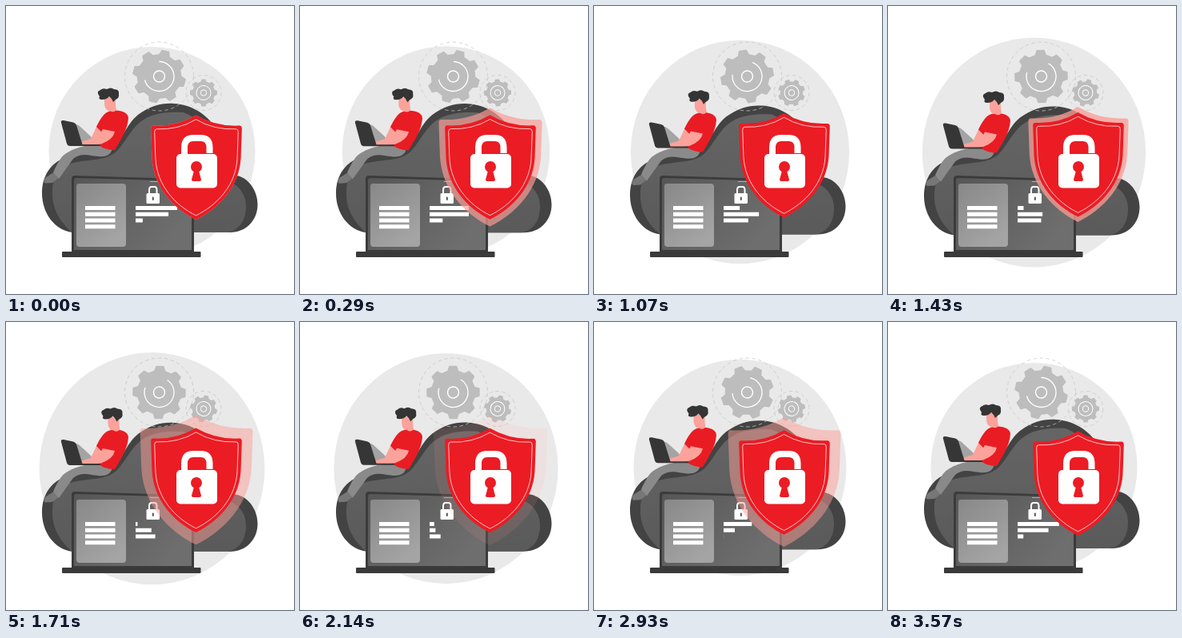
Animation of 360x360 px, one loop 3.64 s. Source, as an HTML page:

```html
<!DOCTYPE html>
<html lang="en">
<head>
<meta charset="utf-8">
<title>Cloud security</title>
<style>
html, body { margin: 0; width: 100%; height: 100%; overflow: hidden; background: #fff; }
svg { display: block; width: 100vw; height: 100vh; }
.thin { fill: none; stroke: #fff; }
.dash { fill: none; stroke: #c6c6c6; stroke-width: .7; stroke-dasharray: 4.5 3.5; }
</style>
</head>
<body>
<svg viewBox="0 0 360 360">
  <defs>
    <linearGradient id="cloudFill" x1="0" y1="0" x2="0" y2="1">
      <stop offset="0" stop-color="#656565"/><stop offset="1" stop-color="#5a5a5a"/>
    </linearGradient>
    <linearGradient id="screenFill" x1="0" y1="0" x2="1" y2=".5">
      <stop offset="0" stop-color="#565656"/><stop offset="1" stop-color="#6e6e6e"/>
    </linearGradient>
    <linearGradient id="panelFill" x1="0" y1="0" x2=".6" y2="1">
      <stop offset="0" stop-color="#888"/><stop offset="1" stop-color="#a4a4a4"/>
    </linearGradient>
    <path id="shield" d="M237.500 136.500Q213 151 184 149.500Q181 149.500 181.200 153.500L182.500 190C184.500 226 209 253 237.500 267C266 253 291.500 226 293.500 190L294.800 153.500Q295 149.500 291.500 149.500Q262 151 237.500 136.500Z"/>
  </defs>

  <ellipse id="disc" fill="#e9e9e9"/>

  <g id="cloud">
    <path fill="#434343" d="M83 283C60 280 45 258 45 234C45 210 58 194 78 188C95 180 115 187 128 180C145 172 148 150 165 136C180 125 195 121 210 122C232 123 250 135 262 152C275 170 284 190 286 211.500C302 213 314.500 230 314.500 248C314.500 268 300 283 280 283Z"/>
    <path fill="url(#cloudFill)" d="M83 283C67 270 57 252 58 232C58 216 66 200 84 196C105 191 125 194 138 182C150 170 156 152 172 142C186 133 205 132 222 133C240 140 255 155 264 175C270 190 274 205 276 219C290 222 300 235 300 250C300 270 290 280 278 283Z"/>
  </g>

  <g transform="translate(191.5 88)"><g id="bigGear">
    <circle class="dash" r="43"/>
    <path class="gear" transform="rotate(14)"/>
    <circle class="thin" r="18.500" stroke-width="1.300" stroke-dasharray="82 34.200" transform="rotate(-90)"/>
    <circle class="thin" r="7" stroke-width="1.400"/>
  </g></g>
  <g transform="translate(247 108.5)"><g id="smallGear">
    <circle class="dash" r="22"/>
    <path class="gear" transform="scale(.51)"/>
    <circle class="thin" r="9" stroke-width="1"/>
    <circle class="thin" r="3.700" stroke-width="1"/>
  </g></g>

  <g id="person">
    <path fill="#a4a4a4" d="M84 148Q89 147 94 152L106 163L112 173L90 175Z"/>
    <path fill="#777" d="M63 206L50 214Q45 219 49 221.500L58 221L67 214Z"/>
    <path fill="#8a8a8a" d="M117 172L133 178C130 190 120 189 107 187C97 185 90 186 84 191L66 216L59 208C65 195 69 187 77 183C90 175 105 174 117 172Z"/>
    <path fill="#fba29b" d="M114 149L121 153L115 167Q110 172 104 172L94 174L93 170L106 166Z"/>
    <path fill="#e91c23" d="M128 132C139 128 153 132 153 140C152 155 143 168 136 180Q124 180 116 174Q119 166 120 158L113 151C117 143 121 135 128 132Z"/>
    <path fill="#fba29b" d="M121 154L136 157Q134 167 119 172.500L97 175V171.500L113 168Z"/>
    <g id="head">
      <path fill="#fba29b" d="M123 114H137V124L138 130Q134 134 130 131Q124 131 123 123Z"/>
      <path fill="#343434" d="M117 113Q112 107 118 105Q121 102 126 104Q131 101 135 104Q142 104 141 110Q142 115 137 117L134 120Q132 115 129 113Q126 117 120 117Q115 117 117 113Z"/>
    </g>
    <path fill="#363636" d="M69 146Q68 142.500 72 143L84 145.500Q87 146 88 149L95.500 173H116Q119 173 118 175H80Q77 175 76 172Z"/>
  </g>

  <g id="laptop">
    <path fill="#3b3b3b" d="M82 216Q82 212 86 212L231 216.500Q235 217 235 221V308H82Z"/>
    <path fill="url(#screenFill)" d="M85 218Q85 215 88 215L229 219Q232 219 232 222V305H85Z"/>
    <path fill="url(#panelFill)" d="M91 222H146Q150 222 150 226V297Q150 301 146 301H92Q88 301 88 297V225Q88 222 91 222Z"/>
    <path stroke="#fff" stroke-width="5" d="M99 252.500H136.500M99 260.300H136.500M99 268H136.500M99 275.700H136.500"/>
    <path id="bars" stroke="#fff" stroke-width="5"/>
    <path stroke="#ccc" stroke-width=".7" d="M180 219.500H191"/>
    <rect x="175.500" y="234" width="16.500" height="13" rx="1.500" fill="#fff"/>
    <path class="thin" stroke-width="2" d="M179 235V230Q179 226 182 226H185.500Q188.500 226 188.500 230V235"/>
    <path fill="none" stroke="#555" stroke-width="2" stroke-linecap="round" d="M183.800 239.500V242"/>
    <rect x="70" y="307" width="173.500" height="7" rx="1" fill="#3a3a3a"/>
  </g>

  <g id="guard">
    <use id="halo" href="#shield" fill="#fb9c95"/>
    <use href="#shield" fill="#eb1c24"/>
    <use href="#shield" class="thin" stroke-width=".8" transform="translate(237.8 203) scale(.92) translate(-237.8 -203)"/>
  </g>
  <rect x="213" y="185" width="51" height="42.500" rx="5" fill="#fff"/>
  <path class="thin" stroke-width="8" d="M223 187V177Q223 165 234 165H243.500Q254.500 165 254.500 177V184"/>
  <circle cx="238" cy="201" r="7" fill="#eb1c24"/>
  <path fill="#eb1c24" d="M235.500 204H240.500L244 217Q244 219 242 219H234Q232 219 232 217Z"/>
</svg>
<script>
const LOOP = 3640, STEPS = 51, TAU = Math.PI * 2;
const el = id => document.getElementById(id);
const set = (id, attrs) => {
  for (const k in attrs) el(id).setAttribute(k, attrs[k]);
};
const move = (id, x, y) => set(id, { transform: `translate(${x} ${y})` });
const wave = (p, shift) => Math.cos(TAU * (p - shift));

// Trapezoid teeth around a disc
function gearPath(teeth, outer, root) {
  const pts = [];
  for (let i = 0; i < teeth; i++) {
    const mid = i / teeth * TAU;
    for (const [da, r] of [[-.23, root], [-.13, outer], [.13, outer], [.23, root]]) {
      const a = mid + da;
      pts.push((r * Math.cos(a)).toFixed(2) + " " + (r * Math.sin(a)).toFixed(2));
    }
  }
  return "M" + pts.join("L") + "Z";
}
for (const g of document.querySelectorAll(".gear")) {
  g.setAttribute("d", gearPath(8, 32.5, 27));
  for (const k of ["fill", "stroke"]) g.setAttribute(k, "#bdbdbd");
  g.setAttribute("stroke-width", 2);
  g.setAttribute("stroke-linejoin", "round");
}

const lines = [
  { y: 252.5, mid: 27, amp: 25, shift: 0 },
  { y: 260.3, mid: 28.5, amp: 23.5, shift: .16 },
  { y: 268, mid: 15.5, amp: 15.5, shift: .32 }
];

function draw(p) {
  const s = (1 - wave(p, 0)) / 2;
  set("disc", { cx: 182.5, cy: 181.2 + 2 * s, rx: 129 + 12 * s, ry: 130.2 + 15 * s });
  set("bigGear", { transform: `rotate(${33 * s})` });
  set("smallGear", { transform: `rotate(${-33 * s})` });
  move("cloud", 0, 4 * s);
  move("person", 0, 4 * s);
  move("head", 4.5 * s, .5 * s);
  move("guard", 0, -4 * s);
  set("bars", {
    d: lines.map(l => `M162 ${l.y}h${l.mid + l.amp * wave(p, l.shift)}`).join("")
  });

  // Three halo pulses per loop: spread, then fade
  const q = p * 3 % 1;
  const k = 1 + .25 * Math.min(1, q / .43);
  set("halo", {
    transform: `translate(237.8 203) scale(${k}) translate(-237.8 -203)`,
    opacity: Math.max(0, .95 - 1.1 * q)
  });
}

function tick() {
  const t = performance.now() % LOOP;
  draw(Math.floor(t / LOOP * STEPS + .05) % STEPS / STEPS);
  requestAnimationFrame(tick);
}
tick();
</script>
</body>
</html>
```
